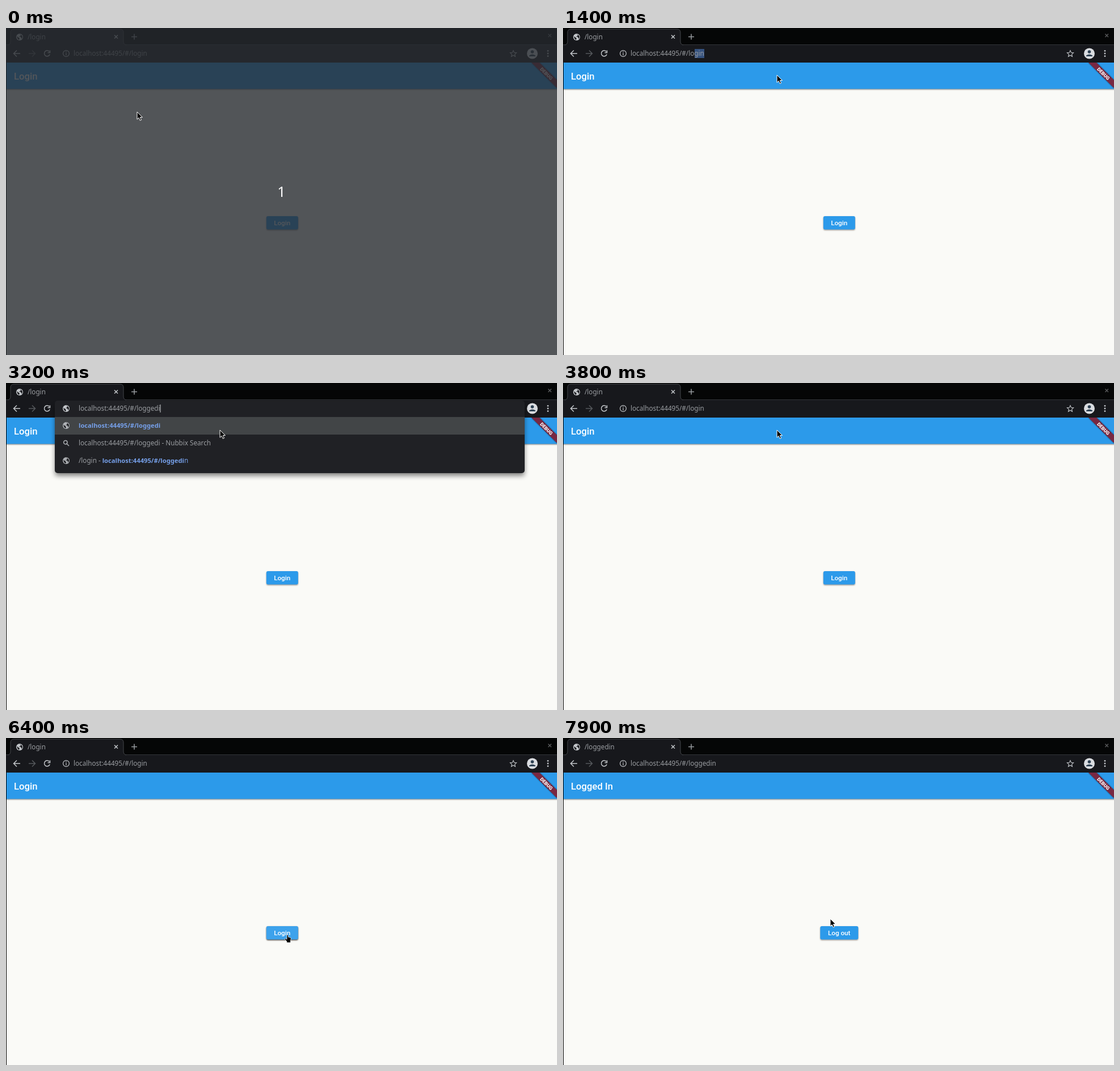
An HTML page for the animation above (8 s loop, 971 by 577 pixels).

```html
<!DOCTYPE html>
<html lang="en">
<head>
<meta charset="utf-8">
<title>Login redirect</title>
<style>
  html, body { margin: 0; width: 100%; height: 100%; overflow: hidden; background: #000; }
  svg { display: block; }
  text { white-space: pre; }
  .ui { font: 11.7px "Noto Sans", sans-serif; fill: #9a9da1; }
  .app { font: 500 16.7px Roboto, sans-serif; fill: #fff; }
  .label { font-size: 11.7px; text-anchor: middle; }
  .bold { font-weight: 700; font-size: 11.2px; }
  .link { fill: #76a0ea; }
  .match { fill: #c3c6ca; }
  .line { fill: none; stroke: #c4c7cb; stroke-width: 1.5; }
</style>
</head>
<body>
<svg width="971" height="577" viewBox="0 0 971 577">
  <defs>
    <g id="globe">
      <circle r="6" fill="#c4c7cb"/>
      <path d="M-4.6-1.5 0 2.5-1 4.9Q-4.4 3.8-4.6-1.5ZM-.5-4.6H2L1.5-2-1.5-.5H1.5L3.5 2 2.7 3.8Q6 1 4.4-2L3-3.7Z" fill="#17181c"/>
    </g>
    <g id="lens" class="line"><circle cx="-1.2" cy="-1.2" r="3.2"/><path d="M1.2 1.2 5 5"/></g>
    <path id="arrow" d="M0 0V13.2L3 10.4 5.2 15.2 7.5 14.2 5.4 9.5H9.4Z" stroke-width="1"/>
    <path id="hand" d="M-1 1Q.2-.6 1.4 1V4.2L5 5Q6.4 5.4 6.2 7L5.4 11V14H-1.2V12L-4.8 7.8Q-4.4 6.2-2.8 7L-1 8.4Z" stroke-width=".7"/>
    <path id="ibeam" d="M-2.5-8Q0-8 0-6.5 0-8 2.5-8M0-6.5V6.5M-2.5 8Q0 8 0 6.5 0 8 2.5 8" stroke-width="1.3"/>
    <filter id="soft" x="-10%" y="-30%" width="120%" height="170%"><feGaussianBlur stdDeviation="1.3"/></filter>
    <filter id="deep" x="-5%" y="-20%" width="110%" height="150%"><feGaussianBlur stdDeviation="5"/></filter>
    <clipPath id="page"><path d="M1 61H971V577H1Z"/></clipPath>
  </defs>

  <rect id="strip" width="971" height="30"/>
  <path d="M0 29.5H971" stroke="#34363a"/>
  <path d="M0 30H971V61H0Z" fill="#17181c"/>
  <path d="M3 30Q8 29 8 24V8Q8 2 14 2H201Q207 2 207 8V24Q207 29 212 30" fill="#17181c" stroke="#45474b"/>
  <use href="#globe" x="24" y="16"/>
  <text id="tab" class="ui" x="38" y="20"></text>
  <g class="line">
    <path d="M191 12.5 197 18.5M197 12.5 191 18.5M14 45H25M19 39.5 13.5 45 19 50.5"/>
    <path d="M221 15.5H231M226 10.5V20.5" stroke="#999ca0"/>
    <path d="M40 45H51M46 39.5 51.5 45 46 50.5" stroke="#55585c"/>
    <path d="M76.2 41.5A5 5 0 1 0 77.2 46.5M77.5 39.5V43.5H73.5"/>
    <path d="M955.5 10.5 961 16M961 10.5 955.5 16" stroke="#58595b"/>
  </g>
  <circle cx="927.5" cy="45" r="9.5" fill="#dadce0"/>
  <g fill="#2d4052"><circle cx="927.5" cy="42" r="2.8"/><path d="M922 50V48.5Q927.5 44.5 933 48.5V50Z"/></g>
  <g fill="#c4c7cb"><circle cx="955" cy="40.3" r="1.4"/><circle cx="955" cy="45" r="1.4"/><circle cx="955" cy="49.7" r="1.4"/></g>

  <g clip-path="url(#page)">
    <path d="M1 61H971V577H1Z" fill="#fafaf7"/>
    <path d="M-9 50H980V108.5H-9Z" opacity=".5" filter="url(#soft)"/>
    <path d="M1 61H971V107.5H1Z" fill="#2c9aea"/>
    <path d="M926 61H940L971 92V106Z" filter="url(#soft)" opacity=".7"/>
    <path d="M926 61H940L971 92V106Z" fill="#782842"/>
    <text transform="translate(952.3 80.7) rotate(45)" y="3" text-anchor="middle" class="app" style="font-size:8.5px;font-weight:900">DEBUG</text>
    <g id="loginPage">
      <text class="app" x="14" y="91">Login</text>
    </g>
    <g id="homePage">
      <text class="app" x="14" y="91">Logged In</text>
    </g>
    <rect id="glow" y="333" height="24" rx="3" filter="url(#soft)"/>
    <rect id="button" y="332" height="23.5" rx="3" fill="#2c9aea"/>
    <rect id="shine" y="332" height="23.5" rx="3" fill="#fff"/>
    <text id="loginLabel" class="app label" x="486.7" y="347.7">Login</text>
    <text id="outLabel" class="app label" x="486.7" y="347.7">Log out</text>
  </g>

  <g id="idleBar">
    <g class="line" style="stroke-width:1.2"><circle cx="106" cy="45" r="5.4"/><path d="M106 44V48.2M106 41.6V43"/></g>
    <path d="M894 39.6 895.6 43.3 899.6 43.7 896.6 46.4 897.5 50.3 894 48.2 890.5 50.3 891.4 46.4 888.4 43.7 892.4 43.3Z" class="line" style="stroke-width:1.1"/>
    <rect id="selection" x="232" y="37" width="17" height="16" fill="#35527f"/>
    <text id="url" class="ui" x="119" y="49"></text>
  </g>

  <g id="popup">
    <rect id="popupShadow" x="87" y="40" width="826" opacity=".55" filter="url(#deep)"/>
    <rect id="popupBox" x="86" y="31" width="828" rx="5" fill="#202125"/>
    <path d="M86 60H914V91H86Z" fill="#424547"/>
    <use href="#globe" x="106" y="45"/>
    <text id="typed" class="ui" x="128" y="49"></text>
    <g id="rows"></g>
  </g>
  <path id="caret" stroke="#d4d6d9"/>

  <g id="countdown">
    <path d="M0 0H971V577H0Z" fill="#282c31" opacity=".8"/>
    <text x="485.3" y="298" text-anchor="middle" fill="#fff" font-size="25" font-family="Noto Sans, sans-serif">1</text>
  </g>
  <use id="cursor" fill="#000" stroke="#fff"/>
</svg>

<script>
const $ = id => document.getElementById(id);
const set = (id, attrs) => { for (const k in attrs) $(id).setAttribute(k, attrs[k]); };
const show = (id, on) => { $(id).style.display = on ? '' : 'none'; };
const ramp = (t, a, b) => Math.min(1, Math.max(0, (t - a) / (b - a)));

const LOOP = 8000, STEP = 100, HOST = 'localhost:44495/#/';
const PATH = [ // time, x, y of the pointer
  [500, 231, 148], [900, 234, 62], [1100, 235, 54], [1300, 235, 54], [1400, 377, 83],
  [5000, 377, 83], [5300, 420, 180], [5600, 494, 361], [5800, 496, 347],
  [7500, 496, 347], [7900, 471, 319]
];
const TYPING = [[2300, 2], [2400, 3], [2600, 4], [2800, 5], [3000, 6], [3200, 7], [3400, 8]];

function pointer(t) {
  const i = PATH.findIndex(p => p[0] >= t);
  if (i < 1) return PATH[i ? PATH.length - 1 : 0].slice(1);
  const [a, x0, y0] = PATH[i - 1], [b, x1, y1] = PATH[i];
  const k = ramp(t, a, b);
  return [x0 + (x1 - x0) * k, y0 + (y1 - y0) * k];
}

const span = (cls, s) => `<tspan class="${cls}">${s}</tspan>`;

function visit(path, typed) {
  const title = 'login'.startsWith(typed) ? span('bold match', typed) + 'login'.slice(typed.length) : 'login';
  return `/${title} - ${span('bold link', HOST + typed)}${span('link', path.slice(typed.length))}`;
}

function drawPopup(typed) {
  const url = HOST + typed, done = typed === 'loggedin';
  const lines = [done ? visit(typed, typed) : span('bold link', url), url + ' - Nubbix Search'];
  if (!done) {
    for (const path of ['login', 'loggedin'])
      if (path.startsWith(typed)) lines.push(visit(path, typed));
  }
  $('typed').textContent = url;
  $('rows').innerHTML = lines.map((line, i) => {
    const y = 75 + 31 * i;
    return `<use href="#${i === 1 ? 'lens' : 'globe'}" x="106" y="${y}" opacity=".85"/>
      <text class="ui" x="128" y="${y + 4}">${line}</text>`;
  }).join('');
  const bottom = 66 + 31 * lines.length;
  set('popupBox', { height: bottom - 31 });
  set('popupShadow', { height: bottom - 36 });
}

function render(t) {
  const home = t >= 6800, fade = ramp(t, 6700, 7100);
  const open = t >= 2300 && t < 3700;
  show('countdown', t < 100);
  set('strip', { fill: t < 900 ? '#000' : '#050606' });

  $('tab').textContent = home ? '/loggedin' : '/login';
  $('url').textContent = HOST + (home || t === 3700 ? 'loggedin' : 'login');
  show('idleBar', !open);
  show('selection', t >= 1400 && t < 2300);
  show('popup', open);
  if (open) drawPopup('loggedin'.slice(0, TYPING.findLast(k => t >= k[0])[1]));
  show('caret', open || t >= 900 && t < 1400);
  const caretX = open ? 128.5 + $('typed').getComputedTextLength() : 232.5;
  set('caret', { d: `M${caretX} 38V52` });

  const width = 56 + 11 * fade, left = 486.8 - width / 2;
  const [x, y] = pointer(t);
  const over = t > 5000 && y >= 332 && y <= 356 && x >= left && x <= left + width;
  const press = ramp(t, 5900, 6400) * (1 - fade);
  const hover = over ? .04 : 0;
  for (const id of ['glow', 'button', 'shine']) set(id, { x: left, width });
  set('glow', { opacity: .38 + press * .3 });
  set('shine', { opacity: hover + press * .04 });
  for (const id of ['loginPage', 'loginLabel']) set(id, { opacity: 1 - fade });
  for (const id of ['homePage', 'outLabel']) set(id, { opacity: fade });

  const shape = over ? 'hand' : t >= 900 && t < 1400 ? 'ibeam' : 'arrow';
  set('cursor', { href: '#' + shape, x, y });
}

let last = -1;
function tick(now) {
  const t = Math.floor(now % LOOP / STEP) * STEP;
  if (t !== last) render(last = t);
  requestAnimationFrame(tick);
}
tick(performance.now());
</script>
</body>
</html>
```
